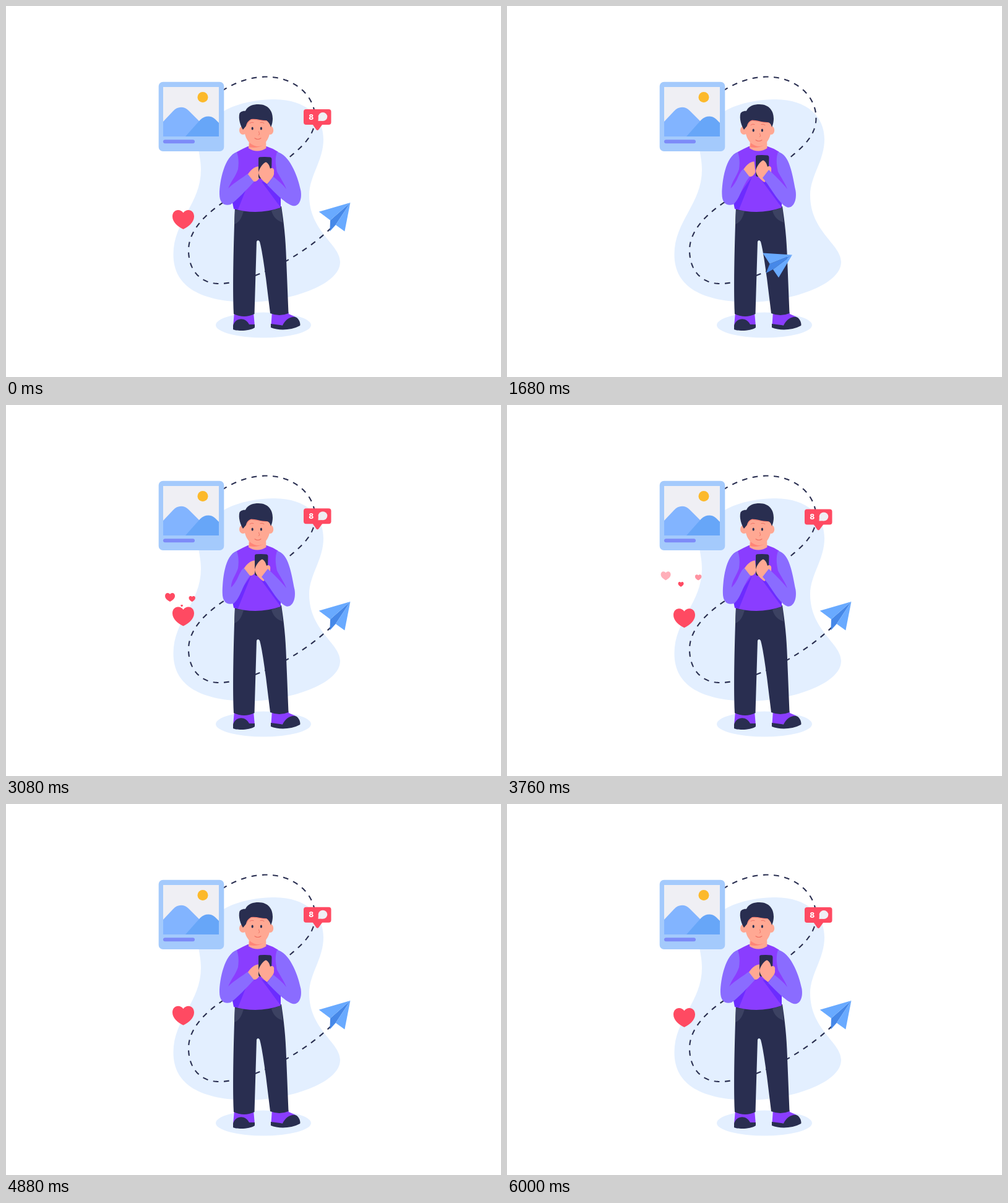
These frames come from a looping animation (800x600 px, 6040 ms). An HTML page with a canvas:

```html
<!DOCTYPE html>
<html lang="en">
<head>
<meta charset="utf-8">
<title>Sharing</title>
<style>
  html, body { margin: 0; width: 100%; height: 100%; overflow: hidden; background: #fff; }
  canvas { display: block; }
</style>
</head>
<body>
<canvas id="stage" width="800" height="600"></canvas>
<script>
const ctx = document.getElementById('stage').getContext('2d');
const LOOP = 6040, STEP = 40;

const C = {
  pale: '#e3efff', navy: '#292e50', purple: '#8a3dff', deep: '#6c2cff', sleeve: '#8a6cff',
  skin: '#ffa893', blush: '#ff8577', line: '#ee6f62', red: '#ff4a62', pocket: '#3c4262',
  frame: '#a4cafc', paper: '#efeff4', sun: '#fcb92b', hill: '#82b4ff', hill2: '#67a6f8',
  bar: '#7d8bf8', plane: '#69aaff', fold: '#4688e8'
};

const clamp = x => Math.min(1, Math.max(0, x));
const ramp = (t, a, b) => clamp((t - a) / (b - a));
const smooth = x => x * x * (3 - 2 * x);
const backOut = x => 1 + 2.2 * (x - 1) ** 3 + 1.2 * (x - 1) ** 2;
const wave = (t, peak, period) => Math.cos((t - peak) / period * Math.PI * 2);

function fill(shape, color) {
  ctx.fillStyle = color;
  ctx.fill(typeof shape === 'string' ? new Path2D(shape) : shape);
}

function stroke(d, color, width) {
  ctx.strokeStyle = color;
  ctx.lineWidth = width;
  ctx.lineCap = 'round';
  ctx.stroke(new Path2D(d));
}

function ellipse(x, y, rx, ry, color) {
  const p = new Path2D();
  p.ellipse(x, y, rx, ry, 0, 0, Math.PI * 2);
  fill(p, color);
}

function box(x, y, w, h, r, color) {
  const p = new Path2D();
  p.roundRect(x, y, w, h, r);
  fill(p, color);
}

function at(x, y, scale, angle, draw) {
  if (scale <= 0) return;
  ctx.save();
  ctx.translate(x, y);
  ctx.rotate(angle);
  ctx.scale(scale, scale);
  draw();
  ctx.restore();
}

// Flight route, sampled evenly by length
const route = document.createElementNS('http://www.w3.org/2000/svg', 'path');
route.setAttribute('d', 'M300 179 C333 143 375 114.5 420 114.5 C466 114.5 499.5 145 499.5 181' +
  ' C499.5 210 478 228 455 247 C425 270 390 292 352 317 C320 338 295 365 295 395' +
  ' C295 425 312 449 345 449 C385 449 472 414 533 351.5');
const routeLength = route.getTotalLength();
const routePoints = [];
for (let s = 0; s <= routeLength; s += 2) routePoints.push(route.getPointAtLength(s));

const flightKeys = [[480, 0], [760, .075], [1280, .47], [1680, .854], [1920, .957], [2160, 1]];

// Smooth interpolation through [time, value] keys
function follow(keys, t) {
  const n = keys.length - 1;
  if (t <= keys[0][0]) return keys[0][1];
  if (t >= keys[n][0]) return keys[n][1];
  const slope = i => i === 0 || i === n ? 0
    : (keys[i + 1][1] - keys[i - 1][1]) / (keys[i + 1][0] - keys[i - 1][0]);
  let i = 0;
  while (t > keys[i + 1][0]) i++;
  const [t0, v0] = keys[i], [t1, v1] = keys[i + 1];
  const d = t1 - t0, u = (t - t0) / d, w = smooth(u);
  return v0 + (v1 - v0) * w + d * u * (1 - u) * (slope(i) * (1 - u) - slope(i + 1) * u);
}

function drawRoute(p) {
  const count = Math.round(p * (routePoints.length - 1));
  if (count < 1) return;
  ctx.save();
  ctx.beginPath();
  routePoints.slice(0, count + 1).forEach(q => ctx.lineTo(q.x, q.y));
  ctx.setLineDash([8.7, 8.6]);
  ctx.lineDashOffset = -134;
  ctx.lineWidth = 2.1;
  ctx.lineCap = 'butt';
  ctx.strokeStyle = C.navy;
  ctx.stroke();
  ctx.restore();
}

function drawPlane(p) {
  const s = p * routeLength;
  const a = route.getPointAtLength(Math.max(0, s - 3));
  const b = route.getPointAtLength(Math.min(routeLength, s + 3));
  const c = route.getPointAtLength(s);
  at(c.x, c.y, .34 + .66 * p, Math.atan2(b.y - a.y, b.x - a.x), () => {
    ctx.translate(2, -6);
    fill('M38.3 -.8 L-4.8 -3.8 L-18.1 8.3 L-3.9 7.6 Z', C.fold);
    fill('M38.3 -.8 L-7.8 -26.6 L-4.8 -3.8 Z', C.plane);
    fill('M38.3 -.8 L-3.9 7.6 L-1.3 25.4 Z', C.plane);
  });
}

function drawBackdrop() {
  fill('M352 170 C375 156 410 151 435 151 C485 152 513 178 513 216 C513 250 490 275 490 306' +
    ' C490 365 540 385 540 414 C540 452 455 479 390 479 C318 478 270.5 456 270.5 402' +
    ' C270.5 348 315 320 315 265 C315 250 312 240 311 230 C308 205 325 185 352 170 Z', C.pale);
  ellipse(416, 516, 77, 20.5, C.pale);
}

function drawPhoto(scale) {
  at(299.5, 179, scale, 0, () => {
    ctx.translate(-299.5, -179);
    box(246.7, 122.8, 105.6, 112.2, 7, C.frame);
    box(254, 131, 90, 80, 0, C.paper);
    ellipse(318, 147.5, 8.5, 8.5, C.sun);
    fill('M254 187 L270 170 C277 162 288 162 295 169 L313 187 L325 211 L254 211 Z', C.hill);
    fill('M290 211 L314 184 C322 177 331 177 338 183 L344 189 L344 211 Z', C.hill2);
    box(254, 216.3, 51, 6, 3, C.bar);
  });
}

function drawLegs() {
  fill('M369 495 L400 495 L402 518 L367 518 Z', C.purple);
  fill('M367 517 C370 504 387 502 393 515 L402 515 L402 520 C395 526 372 526 367 523 Z', C.navy);
  fill('M430 494 L456 494 L457 498 L468 503 L460 517 L428.500 516 Z', C.purple);
  fill('M428 514 L447 516.500 C452 505 464 500 470 504 C476 509 476 517 475 517' +
    ' C460 525 440 525 428 520 Z', C.navy);
  fill('M370 325 L445 324 C449 350 452 375 453 410 L456.500 497 Q442 503 427 497' +
    ' L420 440 C416 410 413 392 410 381 Q407 377 405 381 L401.500 498 Q385 506 368 498' +
    ' C366 450 368 380 370 325 Z', C.navy);
  fill('M370 330 L384 331 Q380 349 369 353 Z', C.pocket);
  fill('M429 331 L445 326 L447 350 Q433 346 429 331 Z', C.pocket);
}

function drawTorso() {
  fill('M391 227 Q382 231 373 236 L374 262 L358 296 L369 312 L368 328 Q406 339 444 326' +
    ' L443 308 L455 297 L438 266 L440 236 Q431 230 421 227 Z', C.purple);
  fill('M393 215 L420 215 L420.500 230 Q406 239 392 230 Z', C.skin);
  fill('M394 221 Q406 230 416 225 Q404 231 393 228 Z', C.blush);
}

function drawHead(nod) {
  ellipse(383, 201, 6, 7, C.skin);
  ellipse(427, 201, 5.2, 7, C.skin);
  fill('M385 180 L385 200 C386 216 395 226 407 227 C419 226 427 213 427 198 L427 180 Z', C.skin);
  const drop = nod * 3;
  at(0, drop, 1, 0, () => {
    ellipse(398.2, 198, 1.6, 2.5, C.navy);
    ellipse(412.4, 198, 1.6, 2.5, C.navy);
    stroke('M394 189.500 Q397 187 400 188.500', C.line, .9);
    stroke('M411 188.500 Q414 187 417 189.500', C.line, .9);
    stroke('M408.500 203 L409.800 207.500 L408 208.500', C.line, .8);
    stroke('M402 213.800 Q407 217.300 412 213.800', C.line, 1.1);
  });
  const fringe = `${421} ${185 + drop} C412 ${185 + drop} 404 ${181.5 + drop} 396 ${183 + drop / 2}`;
  stroke(`M${fringe} Q390 187 389 191`, C.blush, 2.4);
  fill(`M383 200 C379 194 375 182 377.500 173.500 C381 169 386 170 387 169.500
    C391 161 400 159 408 159 C424 159 431 170 431 182 C431 189 429 194 428 196
    C427 192 425 188 ${fringe} Q389 187 388 194 Z`, C.navy);
}

// raise: 0 phone low, 1 phone close; swipe: small move of the left hand
function drawArms(raise, swipe) {
  const lx = 3 * swipe - 9 * raise, ly = -8 * raise;
  const lex = 2 * raise + 3 * swipe;
  const rx = -6 * raise, ry = -3 * raise;
  const wx = -9 * raise, wy = -11 * raise;
  const ex = -10 * raise, ey = 2.5 * raise;

  fill('M396 276 L366 318 L368 328 L375 329 Z', C.deep);
  fill('M413 284 L444 326 L444 304 L432 288 Z', C.deep);

  fill(`M373 236 C353 243 ${345 + lex} 284 ${345 + lex} 304
    C${345 + lex} 319 ${353 + lex} 324 ${363 + lex} 321
    C${374 + lex} 313 ${389 + lx} ${297 + ly} ${401 + lx} ${284 + ly}
    L${391 + lx} ${271 + ly} C${382 + lx} ${278 + ly} ${371 + lex} 284 ${359 + lex} 295
    C364 283 371 276 375 264 C377 251 375 242 373 236 Z`, C.sleeve);
  at(lx, ly, 1, 0, () =>
    fill('M391 272 C396 264 402 260 408 259.500 L410 277 C407 283 403 285 400 283.500 Z', C.skin));
  at(rx, ry, 1, 0, () => {
    fill('M408 247 Q408 244.500 411 244.300 Q419 243.500 427 244.500 Q429.500 245 429.500 248' +
      ' L429 276 Q428 279 425 279 L411 279 Q408 279 408 276 Z', C.navy);
    fill('M408 269 C410 261 416 254 420 252.500 C424 254 426 259 427 263 C432 260 434 265 433 269' +
      ' C434 274 430 278 427 282 L422 288 C416 284 408 276 408 269 Z', C.skin);
  });
  fill(`M438 236 C457 240 ${471 + ex} 272 ${476.5 + ex} 299
    C${479 + ex} 317 ${471 + ex} ${325 + ey} ${463 + ex} ${323 + ey}
    C${449 + ex} ${318 + ey} ${433 + wx} ${300 + wy} ${422 + wx} ${289 + wy}
    L${432 + wx} ${276 + wy} C${439 + wx} ${282 + wy} 447 288 453 296
    C449 285 443 278 438 268 C435 255 435 245 438 236 Z`, C.sleeve);
}

const heart = new Path2D('M0 15.500 C-9 11 -17.500 4 -17.500 -5 C-17.500 -12 -13 -15.500 -8.500 -15.500' +
  ' C-5 -15.500 -2 -14 0 -11 C2 -14 5 -15.500 8.500 -15.500 C13 -15.500 17.500 -12 17.500 -5' +
  ' C17.500 4 9 11 0 15.500 Z');

// start time, x, drift, start y, width
const sparks = [[2600, 271, -18, 335.500, 16], [2700, 296, 18, 333, 10.5], [2995, 284.500, -6.5, 329, 9]];

function drawHearts(t) {
  for (const [start, x, drift, y, width] of sparks) {
    const p = (t - start) / 1450;
    if (p <= 0 || p >= 1) continue;
    ctx.globalAlpha = 1 - ramp(p, .55, 1);
    at(x + drift * p, y - 74 * p, width / 35 * clamp(p / .15), 0, () => fill(heart, C.red));
    ctx.globalAlpha = 1;
  }
  const bob = 1.75 * wave(t, 6000, 1920) - 1.75;
  at(286.5, 345.5 + bob, backOut(ramp(t, 2200, 2600)), 0, () => fill(heart, C.red));
}

function drawBadge(t) {
  const bob = 1.5 * wave(t, 5480, 1920);
  at(503.3, 184.5 + bob, backOut(ramp(t, 2000, 2400)), 0, () => {
    ctx.translate(-503.3, -184.5);
    box(481, 167.300, 44.5, 25, 4, C.red);
    fill('M495 191 L512 191 L505 200.500 Q503.300 202 501.600 200.500 Z', C.red);
    ellipse(512, 179.300, 7.3, 7, C.paper);
    fill('M505 178 L504.500 186.300 L512 186 Z', C.paper);
    ctx.fillStyle = '#fff';
    ctx.font = '800 12px Inter, "Open Sans", sans-serif';
    ctx.textAlign = 'center';
    ctx.textBaseline = 'alphabetic';
    ctx.fillText('8', 493.2, 184);
  });
}

function render(t) {
  ctx.fillStyle = '#fff';
  ctx.fillRect(0, 0, 800, 600);
  const flight = follow(flightKeys, t);
  const raise = smooth(ramp(t, 160, 800)) - smooth(ramp(t, 3930, 4570));
  const nod = smooth(ramp(t, 160, 760)) - smooth(ramp(t, 3800, 4360));
  const swipe = raise * (.5 - .5 * wave(t, 600, 960));

  drawBackdrop();
  drawRoute(flight);
  drawLegs();
  drawTorso();
  drawHead(nod);
  drawArms(raise, swipe);
  if (t > 640) drawPlane(flight);
  drawPhoto(smooth(ramp(t, 40, 720)));
  drawBadge(t);
  drawHearts(t);
}

function tick() {
  const t = Math.floor(performance.now() % LOOP / STEP) * STEP;
  // the loop opens on its finished picture, then starts over
  render(t === 0 ? LOOP - STEP : t);
  requestAnimationFrame(tick);
}
tick();
</script>
</body>
</html>
```
